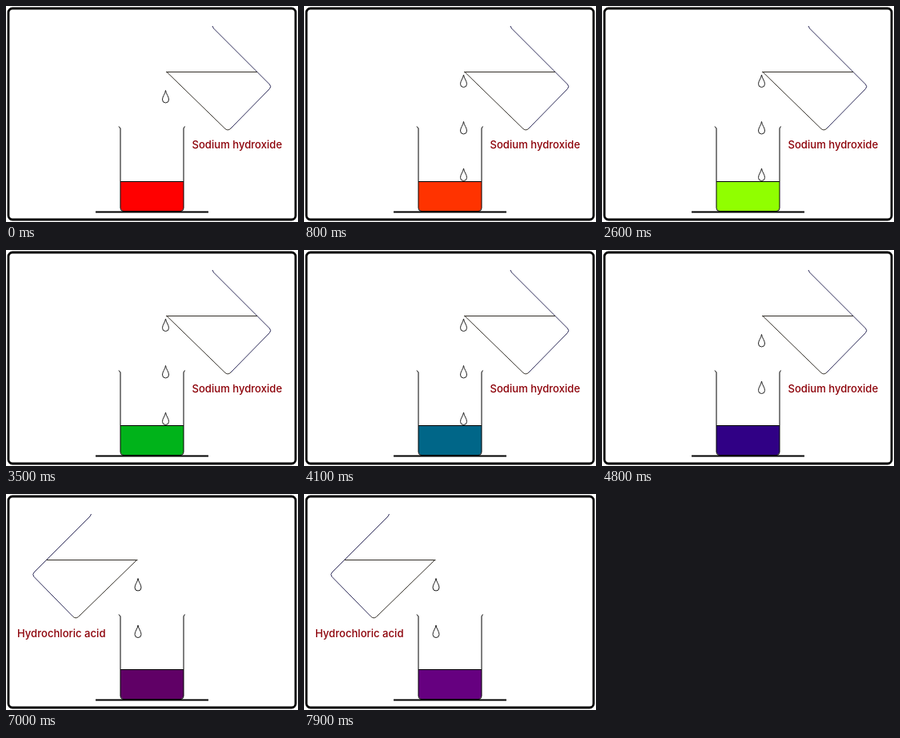
An HTML page that plays this animation: 365 px wide and 270 px high, repeating every 8 s.

```html
<!DOCTYPE html>
<html lang="en">
<head>
<meta charset="utf-8">
<title>Indicator titration</title>
<style>
  html, body { margin: 0; width: 100%; height: 100%; overflow: hidden; background: #fff; }
  svg { display: block; width: 365px; height: 270px; }
  .line { fill: none; stroke: #000; stroke-width: 1; }
  .frame { stroke-width: 2.8; }
  .base { stroke-width: 2; }
  .jug { stroke: #332f28; }
  .glass { stroke: #2c2a58; }
  .drop { fill: #fff; stroke: #222; }
  text { font: 500 13.1px Inter, "Liberation Sans", sans-serif; fill: #8c0008; }
</style>
</head>
<body>
<svg viewBox="0 0 365 270">
  <defs>
    <g id="jug">
      <path class="line glass" d="M258 25L259.5 28L329.5 98Q332 100.500 329.5 103.500L281 153"/>
      <path class="line jug" d="M281 153Q277.500 156.500 274 153.500L201 82.500"/>
      <path class="line jug" d="M200 82.500H314"/>
    </g>
  </defs>
  <rect class="line frame" x="3" y="3" width="359" height="264" rx="5"/>

  <path id="liquid" d="M143 219H222V253L218.500 257H146.500L143 253Z"/>
  <path class="line" d="M143 219.500H222"/>
  <path class="line" d="M141 150.500L143 153V252.500Q143 256.500 147 256.500H218Q222 256.500 222 252.500V153L223.500 150.500"/>
  <path class="line base" d="M112 257.500H253"/>

  <g id="alkali">
    <use href="#jug"/>
    <text x="232.500" y="178">Sodium hydroxide</text>
  </g>
  <g id="acid">
    <use href="#jug" transform="translate(364.500 0) scale(-1 1)"/>
    <text x="14" y="179">Hydrochloric acid</text>
  </g>
  <g id="drops"></g>
</svg>
<script>
  const LOOP = 8000, STEP = 100;
  const SPACING = 3;      // steps between drops
  const FALL = 6;         // steps from lip to surface
  const ACID_START = 67;

  // One colour per drop absorbed
  const COLORS = (
    "f00 f30 f60 f90 fc0 ff0 cf0 90ff00 60f000 30d000 00b31a 009955 006688 003399 " +
    "1a0092 300085 3c007c 480074 540068 600062 600062 600066 600066 63006e 660077 660080"
  ).split(" ").map(c => "#" + c);

  const POURS = {
    alkali: { x: 199.5, first: -1, last: 59 },
    acid: { x: 165, first: 66, last: Infinity }
  };

  const $ = id => document.getElementById(id);
  const drops = Array.from({ length: 3 }, () => {
    const p = document.createElementNS("http://www.w3.org/2000/svg", "path");
    p.setAttribute("class", "line drop");
    p.setAttribute("d", "M0 .5C-.5 5 -4 8 -4 12A4 4 0 0 0 4 12C4 8 .5 5 0 .5Z");
    return $("drops").appendChild(p);
  });

  function draw(step) {
    const name = step < ACID_START ? "alkali" : "acid";
    const pour = POURS[name];
    for (const id in POURS) $(id).style.display = id === name ? "" : "none";

    const absorbed = Math.max(0, Math.floor(step / SPACING) - 1);
    $("liquid").setAttribute("fill", COLORS[Math.min(absorbed, COLORS.length - 1)]);

    const phase = (step - pour.first) % SPACING;
    drops.forEach((drop, i) => {
      const age = phase + i * SPACING;
      const born = step - age;
      const shown = age <= FALL && born >= pour.first && born <= pour.last;
      drop.style.display = shown ? "" : "none";
      drop.setAttribute("transform", `translate(${pour.x} ${85.5 + 19.5 * age})`);
    });
  }

  function tick() {
    draw(Math.floor((performance.now() % LOOP) / STEP));
    requestAnimationFrame(tick);
  }
  tick();
</script>
</body>
</html>
```
